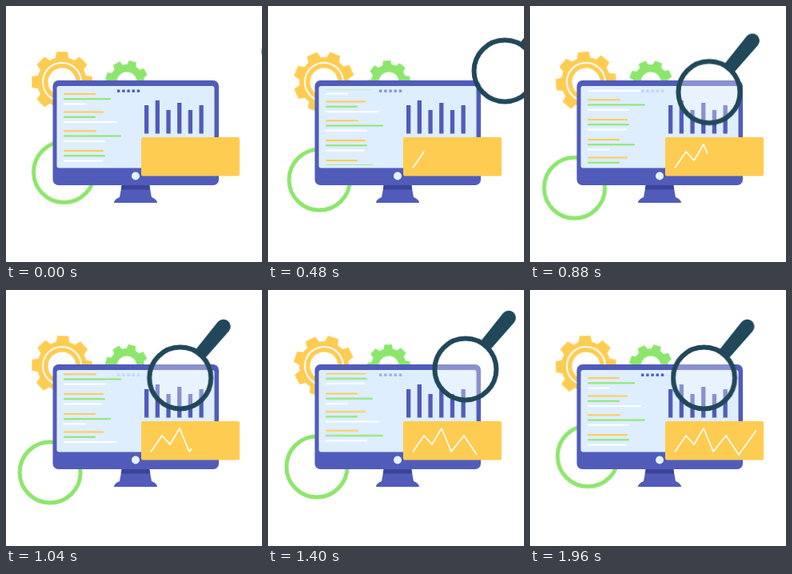
These frames come from a looping animation (320 px wide and 320 px high, 2000 ms). An HTML page:

```html
<!DOCTYPE html>
<html lang="en">
<head>
<meta charset="utf-8">
<title>Data analysis</title>
<style>
html, body { margin: 0; width: 100%; height: 100%; overflow: hidden; background: #fff; }
svg { display: block; width: 100vw; height: 100vh; }
:root {
  --yellow: #ffcc52; --green: #8ce66c; --indigo: #515cba;
  --sine: cubic-bezier(.37, 0, .63, 1);
}
.yellow { fill: var(--yellow); }
.green { fill: var(--green); }
.white { fill: #fff; }
.indigo { fill: var(--indigo); }

.spin { animation: spin 2s linear infinite; }
.back { animation-direction: reverse; }
.ring { animation: drift 1s var(--sine) infinite alternate; }
.dots { animation: fade 1s var(--sine) infinite alternate; }
.code { animation: scroll 2s var(--sine) infinite; }
.trend { stroke-dasharray: 1 2; animation: draw 2s var(--sine) infinite; }
.lens { animation: search 2s var(--sine) infinite; }

/* Eight teeth: a quarter turn closes the loop. */
@keyframes spin { to { transform: rotate(90deg); } }
@keyframes drift {
  from { transform: translate(72.5px, 207.5px); }
  to { transform: translate(55px, 228px); }
}
@keyframes fade { to { opacity: .15; } }
@keyframes scroll { to { transform: translateY(-96px); } }
@keyframes draw {
  from { stroke-dashoffset: 1; }
  to { stroke-dashoffset: 0; }
}
@keyframes search {
  0% { transform: translate(361.5px, 57px); }
  51%, 91%, 100% { transform: translate(217.5px, 110px); }
  71% { transform: translate(247px, 99px); }
}
</style>
</head>
<body>
<svg viewBox="0 0 320 320">
  <defs>
    <clipPath id="view"><rect x="64" y="104" width="100" height="95"/></clipPath>
  </defs>

  <g transform="translate(70 95)">
    <g class="spin yellow">
      <g id="bigTeeth"></g>
      <circle r="31"/>
      <circle r="24" fill="none" stroke="#fff" stroke-width="2"/>
      <circle r="17.5" class="white"/>
    </g>
  </g>
  <g transform="translate(151 95) rotate(16)">
    <g class="spin back green">
      <g id="smallTeeth"></g>
      <circle r="22"/>
      <circle r="12.5" class="white"/>
    </g>
  </g>
  <circle class="ring" r="38" fill="none" stroke="#8ce66c" stroke-width="5"/>

  <path class="indigo" d="M145 223H179L182 239Q189 242 189 246H135Q135 242 142 239Z"/>
  <path fill="#3a4599" d="M144.8 223H179.2L180.3 229.5H143.7Z"/>
  <rect class="indigo" x="58.500" y="93" width="207.500" height="131" rx="7"/>
  <rect x="63.500" y="100" width="197" height="102.500" rx="3" fill="#deeeff"/>
  <circle cx="162" cy="212.500" r="5" fill="#e6f2ff"/>

  <g clip-path="url(#view)"><g class="code" id="code"></g></g>
  <g class="dots indigo" id="dots"></g>
  <g class="indigo" id="bars"></g>

  <g class="lens">
    <circle r="38" fill="#fff" fill-opacity=".33"/>
    <circle r="38.500" fill="none" stroke="#20475a" stroke-width="6"/>
    <path transform="rotate(40)" fill="#20475a" d="M-8-40L-9-84A9 9 0 0 1 9-84L8-40Z"/>
  </g>

  <rect class="yellow" x="169" y="164" width="123" height="48.500" rx="2"/>
  <path class="trend" pathLength="1" fill="none" stroke="#fff" stroke-width="1.700" stroke-linejoin="round"
    d="M181 202.500L195 182L205 193L217 173L229 202L245 182L261 206L283 175"/>
</svg>
<script>
const add = (id, tag, attrs) => {
  const el = document.createElementNS('http://www.w3.org/2000/svg', tag);
  for (const key in attrs) el.setAttribute(key, attrs[key]);
  document.getElementById(id).append(el);
};

const teeth = (id, inner, outer, base, tip) => {
  for (let i = 0; i < 8; i++) add(id, 'path', {
    d: `M${-base} ${-inner}L${-tip} ${-outer}H${tip}L${base} ${-inner}Z`,
    transform: `rotate(${i * 45})`
  });
};
teeth('bigTeeth', 29, 37.7, 8.5, 6.8);
teeth('smallTeeth', 20, 26.8, 6, 4.7);

// Four blocks of yellow, green and white lines, repeated for the scroll.
const blocks = [
  [0, 40, 59, 28],
  [22.5, 50, 40, 67],
  [46.3, 41, 72, 52],
  [71, 50, 52, 49]
];
const tones = ['yellow', 'green', 'white'];
for (const shift of [0, 96]) {
  for (const [top, ...widths] of blocks) {
    widths.forEach((width, i) => add('code', 'rect', {
      x: 72, y: 109 + shift + top + i * 6.2, width, height: 2, rx: .8, class: tones[i]
    }));
  }
}

for (let i = 0; i < 5; i++) {
  add('dots', 'rect', { x: 139 + i * 6.2, y: 104.5, width: 3.4, height: 3.4 });
}
[124, 118, 130, 121, 130, 124].forEach((y, i) => {
  add('bars', 'rect', { x: 173 + i * 13.7, y, width: 5.3, height: 159.5 - y });
});
</script>
</body>
</html>
```
